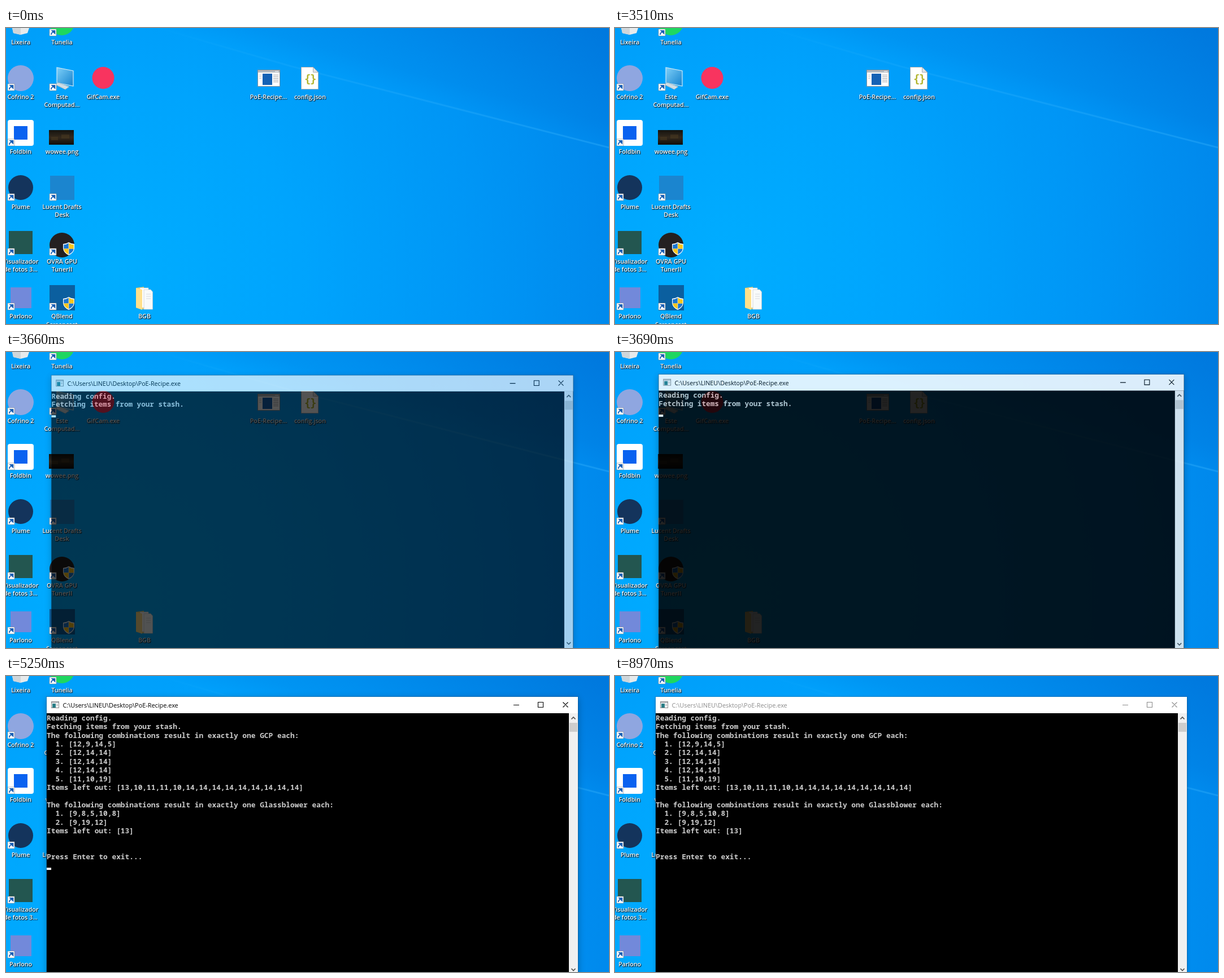
An HTML page that plays this animation: 1067 px wide and 525 px high, repeating every 9090 ms.

```html
<!DOCTYPE html>
<html lang="pt">
<head>
<meta charset="utf-8">
<title>Desktop console</title>
<style>
  html, body { margin: 0; width: 100%; height: 100%; overflow: hidden; background: #009cf8; }
  #stage { position: relative; width: 1067px; height: 525px; overflow: hidden;
    font: 500 10.9px "Open Sans", "Noto Sans", sans-serif; }
  svg { position: absolute; left: 0; top: 0; display: block; }
  .label { position: absolute; width: 120px; text-align: center; white-space: pre;
    font-size: 10.7px; font-weight: 600; line-height: 14.4px; color: #fff;
    text-shadow: 1px 1px 1px rgba(0,0,0,.85), 0 1px 2px rgba(0,0,0,.5); }
  #win { position: absolute; left: 72px; top: 37px; width: 940px; height: 493px; background: #000;
    box-shadow: 0 0 0 1px rgba(20,60,100,.35), 0 3px 12px rgba(0,0,0,.3); color: #000; }
  #win.idle { color: #8c8c8c; box-shadow: 0 0 0 1px rgba(20,60,100,.25), 0 2px 7px rgba(0,0,0,.2); }
  #bar { position: absolute; width: 940px; height: 29px; background: #fff; }
  #title { position: absolute; left: 28.5px; top: 0; line-height: 29px; white-space: pre; font-weight: 400; }
  #out { position: absolute; left: 0; top: 29.8px; margin: 0; color: #ccc;
    font: 600 12.83px/15.4px "Noto Sans Mono", "DejaVu Sans Mono", monospace; }
  #caret { position: absolute; left: 0; width: 8px; height: 4px; background: #fff; }
</style>
</head>
<body>
<div id="stage">
  <svg width="1067" height="525">
    <defs>
      <radialGradient id="sky" gradientUnits="userSpaceOnUse" cx="190" cy="430" r="950">
        <stop offset="0" stop-color="#00adff"/>
        <stop offset=".35" stop-color="#00a4fd"/>
        <stop offset=".7" stop-color="#0095f5"/>
        <stop offset="1" stop-color="#0086ea"/>
      </radialGradient>
      <!-- runs square to the light beam, towards the top right corner -->
      <linearGradient id="shade" gradientUnits="userSpaceOnUse" x1="1014" y1="198" x2="1067" y2="0">
        <stop offset="0" stop-color="#0050b8" stop-opacity="0"/>
        <stop offset=".2" stop-color="#0050b8" stop-opacity=".1"/>
        <stop offset="1" stop-color="#0050b8" stop-opacity=".25"/>
      </linearGradient>
      <linearGradient id="beam" gradientUnits="userSpaceOnUse" x1="270" y1="0" x2="1067" y2="212">
        <stop offset="0" stop-color="#5cf" stop-opacity="0"/>
        <stop offset=".4" stop-color="#4bf" stop-opacity=".18"/>
        <stop offset="1" stop-color="#4bf" stop-opacity=".3"/>
      </linearGradient>
      <linearGradient id="screen" x2="1" y2="1">
        <stop offset="0" stop-color="#7fd0f8"/>
        <stop offset="1" stop-color="#1583cf"/>
      </linearGradient>
      <linearGradient id="thumb" x2="0" y2="1">
        <stop offset="0" stop-color="#14130f"/>
        <stop offset=".5" stop-color="#33291d"/>
        <stop offset="1" stop-color="#100e0b"/>
      </linearGradient>
      <g id="link">
        <rect width="12" height="12" fill="#fff" stroke="#8a8a8a" stroke-width=".6"/>
        <path d="M3 10Q3 6 7 5.2M4.6 2.8H9.4V7.6Z" fill="none" stroke="#1a5fb4" stroke-width="1.8"/>
        <path d="M4.6 2.8H9.4V7.6Z" fill="#1a5fb4"/>
      </g>
      <g id="shield">
        <path d="M0-11Q5-8 10-8V0Q9 8 0 12Q-9 8-10 0V-8Q-5-8 0-11Z" fill="#fff"/>
        <path d="M-.3-9.6V.6H-8.8V-6.8Q-4-7-.3-9.6ZM.3.6H8.7Q8 7 .3 10.5Z" fill="#1b77d2"/>
        <path d="M.3-9.6V.6H8.8V-6.8Q4-7 .3-9.6ZM-.3.6H-8.7Q-8 7-.3 10.5Z" fill="#ffc61a"/>
      </g>
      <g id="app">
        <rect x=".5" y=".5" width="39" height="29" fill="#fff" stroke="#8b9096"/>
        <path d="M1 1H39V5H1Z" fill="#b5babf"/>
        <path d="M31 3H37" stroke="#fff"/>
        <rect x="9" y="7" width="17" height="20" fill="#1562b5"/>
        <path d="M28 9.5H37M28 12.5H37M28 15.5H37M28 18.5H37M28 21.5H37" stroke="#a0a4a8"/>
        <path d="M3 9.5H7M3 12.5H7M3 15.5H7" stroke="#c4c8cc"/>
      </g>
    </defs>

    <rect width="1067" height="525" fill="url(#sky)"/>
    <path d="M270 0L505 68L1067 212V0Z" fill="url(#shade)"/>
    <path d="M270 0L505 68L1067 212" fill="none" stroke="url(#beam)" stroke-width="3"/>

    <rect id="sel" x="428.5" y="64.5" width="72" height="66" fill="#b4dcff" fill-opacity=".35"
      stroke="#c4e4ff" stroke-opacity=".65"/>

    <path d="M11 0H41L38 9L26 12L13 9Z" fill="#e6eaec"/>
    <path d="M26 0V12L13 9L11 0Z" fill="#cfd6da"/>
    <circle cx="99" cy="-9" r="22" fill="#1ed760"/>
    <circle cx="26" cy="89" r="23" fill="#8fa6e0"/>
    <rect x="3" y="163" width="46" height="46" rx="4" fill="#fff"/>
    <rect x="14" y="174" width="24" height="24" fill="#0a62f0"/>
    <circle cx="26" cy="283" r="22" fill="#14345c"/>
    <rect x="5" y="360" width="42" height="41" fill="#235650"/>
    <rect x="8" y="460" width="37" height="37" fill="#7289da"/>

    <path d="M90 70L119 76V103L90 97Z" fill="url(#screen)" stroke="#d4ecf8" stroke-width="1.2"/>
    <path d="M86 100L93 97L112 104L105 109Z" fill="#dfeaf0" stroke="#8da9b8" stroke-width=".8"/>
    <path d="M89 100.5L107 107M92 99L110 105" stroke="#9fb3bf" stroke-width=".7"/>
    <rect x="76" y="181" width="44" height="26" fill="url(#thumb)"/>
    <path d="M80 193H92V199H80ZM98 189H112V196H98Z" fill="#4b3b22" opacity=".5"/>
    <rect x="78" y="262" width="43" height="43" fill="#1b85cf"/>
    <circle cx="99" cy="385" r="22" fill="#242021"/>
    <rect x="77" y="456" width="45" height="45" fill="#0b5f9f"/>
    <use href="#shield" x="111" y="391"/>
    <use href="#shield" x="111" y="488"/>
    <circle cx="172" cy="88.5" r="19.5" fill="#f8345f"/>

    <use href="#app" x="445" y="74"/>
    <path d="M522.5 69.5H543.5L552.5 78.5V108.5H522.5Z" fill="#fff" stroke="#a8adb2"/>
    <path d="M543.5 69.5V78.5H552.5Z" fill="#e2e5e8" stroke="#a8adb2"/>
    <text x="538" y="97" text-anchor="middle" fill="#b3b52f"
      style="font:700 19px 'DejaVu Sans Mono',monospace;letter-spacing:-1.5px">{}</text>

    <path d="M230 461L244 459V499L230 496Z" fill="#f4cf68"/>
    <path d="M237 461H252V496H237Z" fill="#fff" stroke="#d0d4d6" stroke-width=".7"/>
    <path d="M244 464H256L259.5 468V499H244Z" fill="#f8fafa" stroke="#c3c8cb" stroke-width=".7"/>
    <path d="M248 472H256M248 476H256M248 480H256" stroke="#d6dadd"/>
    <path d="M230 461L241 464V500L230 496Z" fill="#ffe08a"/>
    <g id="links"></g>
  </svg>

  <div id="labels"></div>

  <div id="win">
    <div id="bar"></div>
    <svg width="940" height="493">
      <g transform="translate(8 8)">
        <rect x=".5" y=".5" width="13" height="11" fill="#fff" stroke="#888"/>
        <path d="M1 1H13V3H1Z" fill="#b5babf"/>
        <rect x="2" y="4" width="6" height="7" fill="#2a7d86"/>
        <path d="M9 5.5H12M9 7.5H12" stroke="#aaa"/>
      </g>
      <path d="M826 14.5H836M869.5 9.5H878.5V18.5H869.5ZM913.5 9.5L922.5 18.5M922.5 9.5L913.5 18.5"
        fill="none" stroke="currentColor" stroke-width="1.1"/>
      <rect x="924" y="29" width="16" height="464" fill="#f0f0f0"/>
      <rect x="925" y="46" width="14" height="16" fill="#cdcdcd"/>
      <path d="M928.5 39.5L932 36L935.5 39.5M928.5 482L932 485.5L935.5 482"
        fill="none" stroke="#505050" stroke-width="1.7"/>
    </svg>
    <div id="title">C:\Users\LINEU\Desktop\PoE-Recipe.exe</div>
    <pre id="out"></pre>
    <div id="caret"></div>
  </div>
</div>

<script>
  const LOOP = 9090, STEP = 30, ROW = 15.4;
  const $ = id => document.getElementById(id);

  // centre x, centre y of the first line, text
  const labels = [
    [26, 25, 'Lixeira'], [99, 25, 'Tunelia'],
    [26, 122, 'Cofrino 2'], [99, 122, 'Este\nComputad...'], [172, 122, 'GifCam.exe'],
    [26, 219.5, 'Foldbin'], [99, 219.5, 'wowee.png'],
    [26, 317, 'Plume'], [99, 317, 'Lucent Drafts\nDesk'],
    [26, 414, 'Visualizador\nde fotos 3...'], [99, 414, 'OVRA GPU\nTunerII'],
    [26, 511.5, 'Parlono'], [99, 511.5, 'QBlend\nScreencast'], [245, 511.5, 'BGB'],
    [538, 122, 'config.json'], [464.5, 122, 'PoE-Recipe...']
  ];
  let exeLabel;
  for (const [x, y, text] of labels) {
    exeLabel = $('labels').appendChild(document.createElement('div'));
    exeLabel.className = 'label';
    exeLabel.textContent = text;
    exeLabel.style.left = x - 60 + 'px';
    exeLabel.style.top = y - 7.2 + 'px';
  }

  const links = [[77, 2], [77, 99], [77, 294], [77, 391], [77, 488],
    [3, 99], [3, 197], [3, 294], [3, 391], [3, 488]];
  $('links').innerHTML = links.map(([x, y]) => `<use href="#link" x="${x}" y="${y}"/>`).join('');

  const intro = 'Reading config.\nFetching items from your stash.\n';
  const result = intro + `The following combinations result in exactly one GCP each:
  1. [12,9,14,5]
  2. [12,14,14]
  3. [12,14,14]
  4. [12,14,14]
  5. [11,10,19]
Items left out: [13,10,11,11,10,14,14,14,14,14,14,14,14,14]

The following combinations result in exactly one Glassblower each:
  1. [9,8,5,10,8]
  2. [9,19,12]
Items left out: [13]


Press Enter to exit...
`;

  const within = (t, a, b) => t >= a && t < b;
  const setText = (el, s) => { if (el.textContent !== s) el.textContent = s; };
  const show = (el, on) => { el.style.display = on ? 'block' : 'none'; };
  const caretOn = [[3570, 4530], [5040, 6060], [6570, 7080], [7590, 8070], [8610, 8970]];

  function render(ms) {
    const t = Math.floor(ms % LOOP / STEP) * STEP;

    // icon selection; the caption unfolds after a short delay
    const wide = within(t, 1860, 2220);
    show($('sel'), within(t, 1350, 2220));
    $('sel').setAttribute('height', wide ? 80 : 66);
    setText(exeLabel, wide ? 'PoE-Recipe.e\nxe' : 'PoE-Recipe...');

    // window fades in while growing with a quadratic ease-out
    const left = 1 - Math.min(1, Math.max(0, (t - 3570) / 240));
    const win = $('win');
    show(win, t >= 3570);
    win.style.opacity = Math.min(1, Math.max(0, .3 + (t - 3600) * .0062));
    win.style.transform = left ? `scale(${1 - .0457 * left * left})` : 'none';
    win.className = t >= 8970 ? 'idle' : '';

    const done = t >= 5250;
    setText($('out'), done ? result : intro);
    // the caret sits at the foot of the row after the last line
    $('caret').style.top = 29.8 + ROW * (done ? 18 : 3) - 4.2 + 'px';
    show($('caret'), caretOn.some(([a, b]) => within(t, a, b)));
  }

  const start = performance.now();
  function tick() {
    render(performance.now() - start);
    requestAnimationFrame(tick);
  }
  tick();
</script>
</body>
</html>
```
